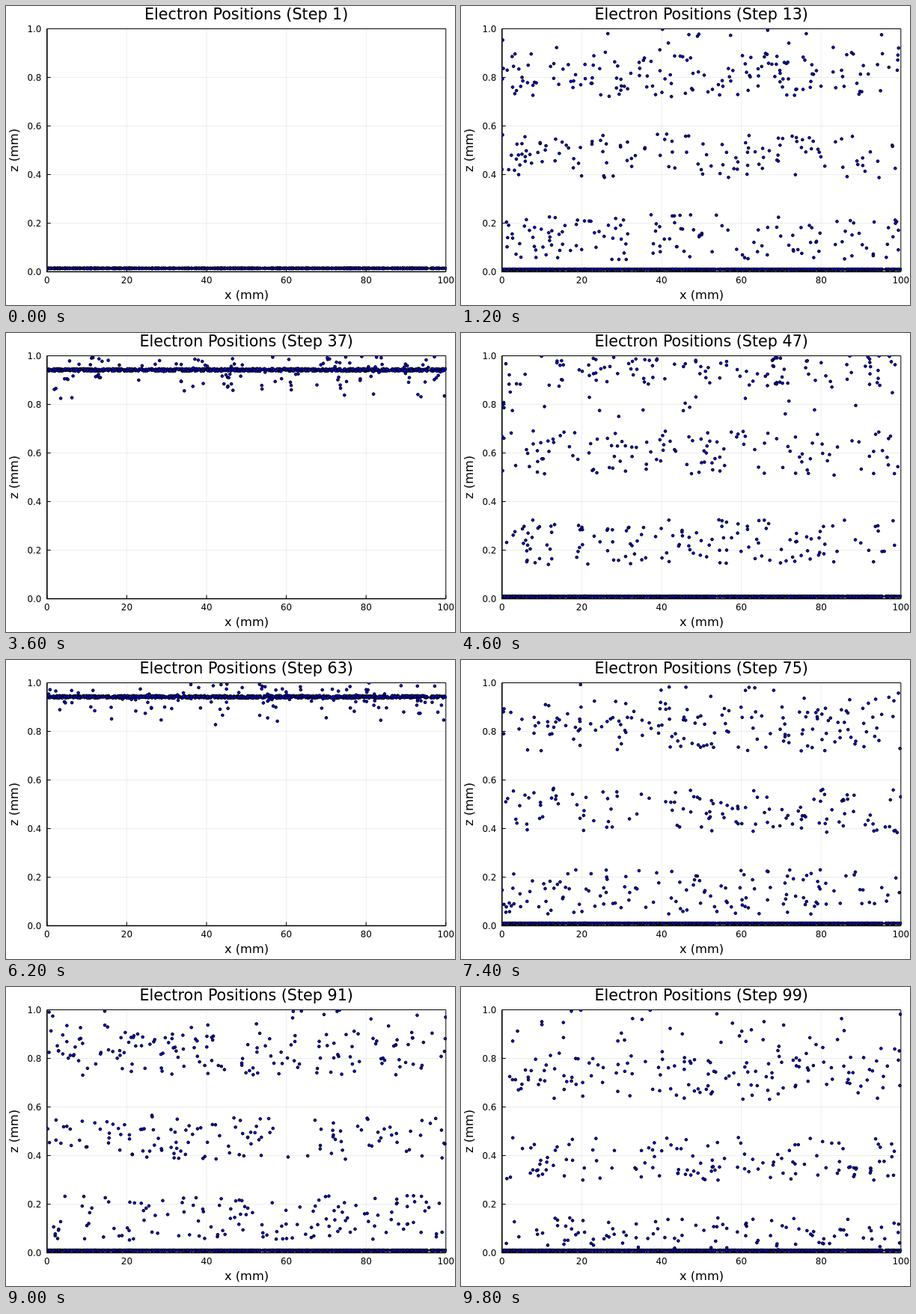
An HTML page with a canvas that plays this animation: 600 by 400 pixels, repeating every 10000 ms.

```html
<!DOCTYPE html>
<html lang="en">
<head>
<meta charset="utf-8">
<title>Electron Positions</title>
<style>
  html, body { margin: 0; width: 100%; height: 100%; overflow: hidden; background: #fff; }
  svg, canvas { position: absolute; left: 0; top: 0; width: 600px; height: 400px; }
  text { font-family: "DejaVu Sans", sans-serif; font-size: 11.9px; text-anchor: middle; }
  .label { font-size: 16.3px; }
  .title { font-size: 20.7px; }
  .right { text-anchor: end; }
  .grid { stroke: #000; stroke-opacity: .1; stroke-width: .7; }
  .axis { stroke: #000; stroke-width: 1; fill: none; }
  .main { stroke-width: 1.6; }
</style>
</head>
<body>
<svg id="plot" viewBox="0 0 600 400">
  <text id="title" class="title" x="321.2" y="18.4"></text>
  <text class="label" x="321.5" y="392">x (mm)</text>
  <text class="label" transform="translate(16 193) rotate(-90)">z (mm)</text>
</svg>
<canvas id="dots" width="600" height="400"></canvas>
<script>
const FRAME_MS = 200, FRAMES = 50, LINE_COUNT = 900;
const RF_PERIOD = 2.6, DRIFT_PERIOD = 52; // in frames
const START_Z = .014, LOW_Z = .01, HIGH_Z = .942;
const px = x => 54.8 + 5.33 * x;
const pz = z => 355.5 - 325 * z;
const plot = document.getElementById('plot');
const title = document.getElementById('title');
const ctx = document.getElementById('dots').getContext('2d');

function add(tag, attrs, text = '') {
  const el = document.createElementNS('http://www.w3.org/2000/svg', tag);
  for (const key in attrs) el.setAttribute(key, attrs[key]);
  el.textContent = text;
  plot.append(el);
}

function drawAxes() {
  const left = px(0), right = px(100), top = pz(1), bottom = pz(0);
  for (let i = 0; i <= 5; i++) {
    const x = px(i * 20), y = pz(i / 5);
    if (i % 5) add('path', { class: 'grid', d: `M${x} ${top}V${bottom}M${left} ${y}H${right}` });
    add('path', { class: 'axis', d: `M${x} ${bottom}v-5M${left} ${y}h5` });
    add('text', { x, y: 371.3 }, i * 20);
    add('text', { x: 47.3, y: y + 4.6, class: 'right' }, (i / 5).toFixed(1));
  }
  add('path', { class: 'axis', d: `M${left} ${top}H${right}V${bottom}` });
  add('path', { class: 'axis main', d: `M${left} ${top}V${bottom}H${right}` });
}

function random(seed) {
  let a = seed * 7919 + 17;
  return () => {
    a = (a + 0x6D2B79F5) | 0;
    let t = Math.imul(a ^ (a >>> 15), 1 | a);
    t = (t + Math.imul(t ^ (t >>> 7), 61 | t)) ^ t;
    return ((t ^ (t >>> 14)) >>> 0) / 4294967296;
  };
}

const lineRandom = random(1);
const lineX = Array.from({ length: LINE_COUNT }, () => .1 + 99.8 * lineRandom());

function dot(x, z) {
  if (z < 0 || z > 1) return;
  ctx.beginPath();
  ctx.arc(px(x), pz(z), 1.85, 0, 2 * Math.PI);
  ctx.fill();
  ctx.stroke();
}

function scatter(count, rnd, height) {
  for (let i = 0; i < count; i++) dot(100 * rnd(), height());
}

// The field lifts the whole sheet to the top near the crest of its swing.
function drawLifted(rnd, growth) {
  for (const x of lineX) dot(x, HIGH_Z + (rnd() - .5) * .01);
  scatter(150 * growth, rnd, () => HIGH_Z + .12 * (rnd() + rnd() - 1));
}

// Otherwise the sheet rests below and emitted bands cross the gap.
function drawResting(rnd, growth, frame, swing) {
  const drift = Math.cos(2 * Math.PI * (frame - 23) / DRIFT_PERIOD);
  const shift = .16 * drift * Math.max(0, swing);
  const spacing = .335 + .35 * Math.max(0, shift);
  for (const x of lineX) dot(x, LOW_Z);
  for (let band = 0; band < 3; band++) {
    const low = .05 + shift + band * spacing;
    scatter((140 - 12 * band) * growth, rnd, () => low + .185 * rnd());
  }
  scatter(55 * growth, rnd, () => .75 + .25 * rnd());
}

function drawFrame(frame) {
  const rnd = random(frame + 2);
  const swing = Math.cos(2 * Math.PI * frame / RF_PERIOD);
  const growth = Math.min(1, frame / 6);
  title.textContent = `Electron Positions (Step ${2 * frame + 1})`;
  ctx.clearRect(0, 0, 600, 400);
  if (frame === 0) lineX.forEach(x => dot(x, START_Z));
  else if (swing > .7) drawLifted(rnd, growth);
  else drawResting(rnd, growth, frame, swing);
}

drawAxes();
ctx.beginPath();
ctx.rect(54, 30, 535, 326);
ctx.clip();
ctx.fillStyle = '#00f';
ctx.strokeStyle = '#000';
ctx.lineWidth = 1;

const start = performance.now();
let shown = -1;
function tick() {
  const frame = Math.floor((performance.now() - start) / FRAME_MS) % FRAMES;
  if (frame !== shown) drawFrame(shown = frame);
  requestAnimationFrame(tick);
}
tick();
</script>
</body>
</html>
```
